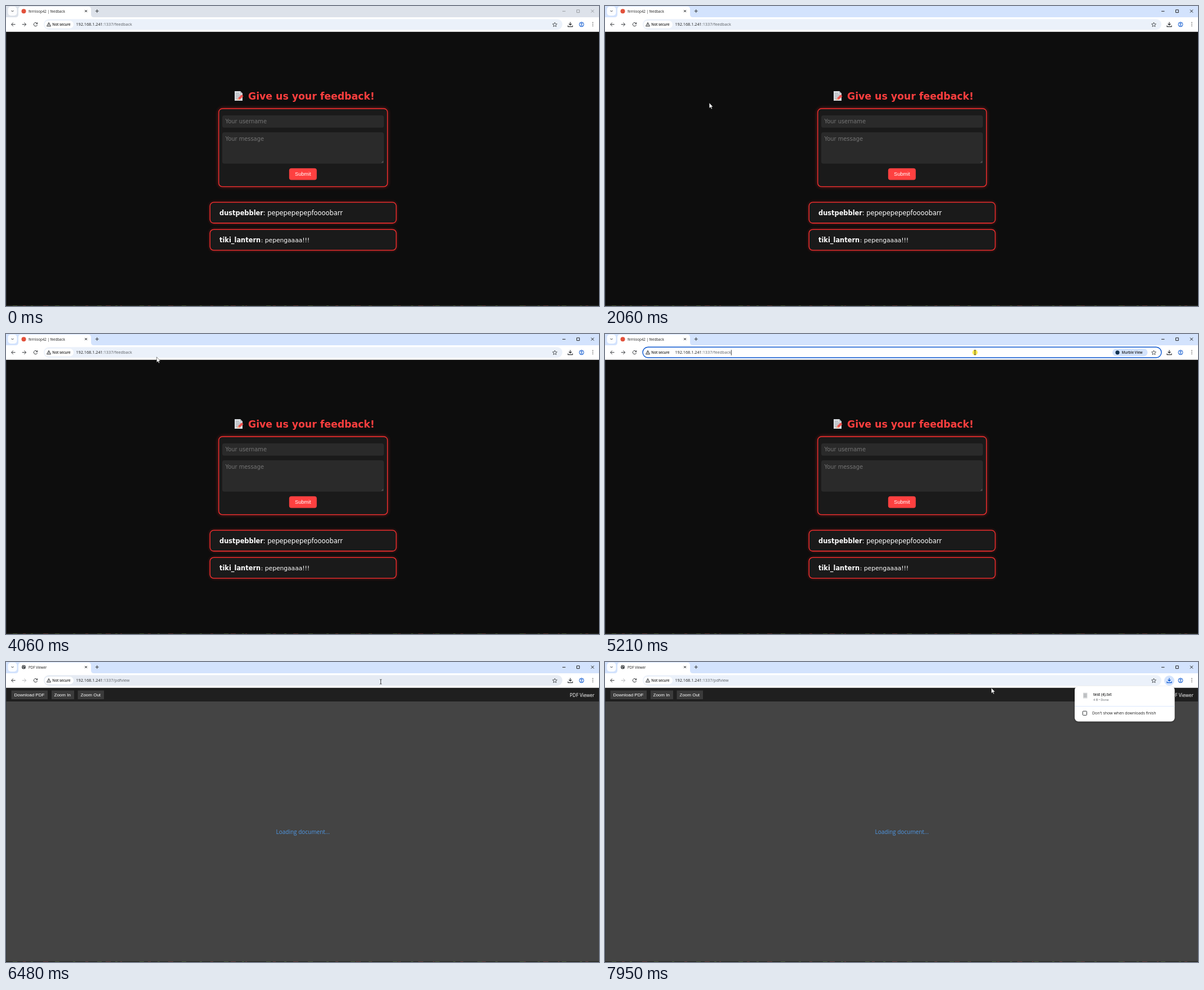
Write an HTML page that moves like this. It is 1053 by 532 pixels and loops after 8 s.

```html
<!DOCTYPE html>
<html lang="en">
<head>
<meta charset="utf-8">
<title>Feedback form</title>
<style>
  html, body { margin: 0; height: 100%; overflow: hidden; background: #0d0d0d; }
  svg { display: block; width: 100vw; height: 100vh; }
  text { font-family: "Open Sans", "Noto Sans", sans-serif; font-size: 7.27px; fill: #1f1f1f; white-space: pre; }
  .small, .small text { font-size: 6.2px; }
  .semi { font-weight: 600; }
  .grey { fill: #5b5f64; }
  .blue { fill: #0b57d0; }
  .wide text { font-family: "DejaVu Sans", sans-serif; fill: #fff; font-size: 11.4px; }
  .wide .title { font-size: 17.3px; font-weight: bold; fill: #ff3f3f; }
  .wide .hint { font-size: 9.87px; fill: #757575; }
  .arial text { font-family: "Liberation Sans", Arial, sans-serif; font-size: 8px; fill: #fff; }
  .panel { fill: #1a1a1a; stroke: #ff3030; stroke-width: 1.3; }
  .line { fill: none; stroke: #333639; stroke-width: 1; }
  .glow { filter: drop-shadow(0 0 3px rgba(255, 51, 51, .45)); }
</style>
</head>
<body>
<svg viewBox="0 0 1053 532" preserveAspectRatio="none">
  <defs>
    <clipPath id="chipClip"><rect id="chipWindow" x="68" y="24" width="49" height="18"/></clipPath>
    <g id="globe">
      <circle r="3.5" fill="#3c4043"/>
      <path d="M-2.6-.8Q-1-.6-1 .4T.2 2.6M.3-2.8Q-.6-1.4.9-1T2.8.2" class="line" style="stroke:#fff;stroke-width:.9"/>
    </g>
    <g id="tray">
      <path d="M0-4.3V1M-2.4-1.2L0 1.2L2.4-1.2M-4 1.8V4H4V1.8" fill="none" stroke-width="1.2"/>
    </g>
  </defs>

  <!-- feedback page -->
  <g id="feedback" class="wide">
    <rect y="45" width="1053" height="487" fill="#0d0d0d"/>
    <g>
      <path d="M406 151H416L420 155V168H406Z" fill="#d9dce0"/>
      <path d="M416 151V155H420Z" fill="#aab0b6"/>
      <path d="M408 155H414M408 158H417M408 161H415M408 164H412" stroke="#8e959c" stroke-width=".9"/>
      <path d="M410.5 167L412 163.5L418.5 157L421.5 160L415 166Z" fill="#ef5350"/>
      <path d="M410.5 167L412 163.5L415 166Z" fill="#f3c99b"/>
    </g>
    <text class="title" x="430" y="165.5">Give us your feedback!</text>
    <rect class="panel glow" x="377.8" y="182" width="299.6" height="138.4" rx="6.5"/>
    <rect x="384" y="194" width="287" height="21.7" rx="3.5" fill="#2a2a2a"/>
    <rect x="384" y="224" width="287" height="55.4" rx="3.5" fill="#2a2a2a"/>
    <path d="M667 278L670 275M669 278L670 277" stroke="#999" stroke-width=".6"/>
    <text class="hint" x="389.5" y="208">Your username</text>
    <text class="hint" x="389.5" y="238.5">Your message</text>
    <rect x="502.8" y="287.7" width="49" height="20.8" rx="4" fill="#ff4040"/>
    <g class="arial"><text x="513" y="301.2" style="font-size:9.2px">Submit</text></g>
    <g id="card1">
      <rect class="panel" x="362.3" y="348.2" width="330.6" height="36.8" rx="6.5"/>
      <text x="379" y="370.5" font-weight="bold">dustpebbler</text>
      <text x="456.7" y="370.5">: pepepepepepfoooobarr</text>
    </g>
    <g id="card2">
      <rect class="panel" x="362.3" y="396.3" width="330.6" height="36.8" rx="6.5"/>
      <text x="379" y="418.5" font-weight="bold">tiki_lantern</text>
      <text x="452.8" y="418.5" style="font-size:10.7px">: pepengaaaa!!!</text>
    </g>
  </g>

  <!-- document viewer page -->
  <g id="viewer">
    <rect y="45" width="1053" height="487" fill="#444"/>
    <rect y="45" width="1053" height="25" fill="#1f1f1f"/>
    <g class="arial">
      <path d="M9.5 50.5H74V66H9.5ZM81 50.5H121V66H81ZM127.5 50.5H174V66H127.5Z" fill="#3b3b3b"/>
      <text x="14.5" y="61">Download PDF</text>
      <text x="85.5" y="61">Zoom In</text>
      <text x="132.5" y="61">Zoom Out</text>
    </g>
    <text x="1001" y="61.8" style="font-size:8.4px;fill:#fff">PDF Viewer</text>
    <text x="479.5" y="304.5" style="font-size:10px;fill:#4f97e3">Loading document...</text>
  </g>

  <!-- desktop showing around the window -->
  <path d="M.4 46V532" stroke="#33383a" stroke-width=".8"/>
  <path d="M0 531.4H1053" stroke="#24271f" stroke-width="1.2"/>
  <path d="M30 531.5H1053" stroke="#5a3430" stroke-dasharray="5 31 9 17 3 46"/>
  <path d="M12 531.5H1053" stroke="#41502f" stroke-dasharray="8 24 4 39"/>

  <!-- browser frame -->
  <rect id="titleBar" width="1053" height="22"/>
  <rect x="3.5" y="1" width="16" height="16" rx="5" fill="#fff" opacity=".9"/>
  <path class="line" d="M9.5 8L11.5 10L13.5 8"/>
  <path d="M17 20Q22 20 22 15V6Q22 1 27 1H146Q151 1 151 6V15Q151 20 156 20H1053V45.7H0V20Z" fill="#fff"/>
  <path class="line" d="M140 7L144 11M144 7L140 11M161.7 6V12M158.7 9H164.7"/>
  <circle id="siteMark" cx="31.5" cy="9.3" r="4" fill="#e2513b"/>
  <use id="tabGlobe" href="#globe" x="31.5" y="9"/>
  <text id="tabTitle" class="small" x="40" y="11.5"></text>
  <path id="controls" class="line" d="M988 9.3H993.5M1013.5 6.8H1018.3V11.6H1013.5ZM1039 6.6L1044 11.6M1044 6.6L1039 11.6"/>
  <path class="line" d="M16.5 32.7H9.8M12.8 29.5L9.6 32.7L12.8 35.9"/>
  <path id="forward" class="line" d="M28.7 32.7H35.4M32.4 29.5L35.6 32.7L32.4 35.9"/>
  <path class="line" d="M55.3 31A3.2 3.2 0 1 0 55.6 33.5M55.8 29.2V31.6H53.2"/>
  <circle id="halo" cx="1002" cy="33" r="9" fill="#d3e3fd"/>
  <use id="download" href="#tray" x="1002" y="32.7"/>
  <g fill="none" stroke="#0b57d0">
    <circle cx="1022" cy="32.7" r="4"/><circle cx="1022" cy="31.5" r="1.3"/>
    <path d="M1019.4 35.6Q1022 33.2 1024.6 35.6"/>
  </g>
  <path d="M1042 29.3V37" stroke="#333" stroke-width="1.5" stroke-linecap="round" stroke-dasharray="0 3"/>

  <!-- address bar -->
  <rect id="bar" x="67" y="23.2" width="921" height="18.8" rx="9.4"/>
  <rect id="chip" x="68.5" y="26" height="13.6" rx="6.8" fill="#fff"/>
  <path class="line" d="M76 29.3L79.5 35.8H72.5ZM76 31.5V33.6M76 34.2V35" stroke-width=".9"/>
  <g clip-path="url(#chipClip)"><text class="small semi" x="82.3" y="35">Not secure</text></g>
  <g id="address">
    <rect id="selection" x="124" y="27.5" width="100" height="11" fill="#a8c7fa"/>
    <text x="124.4" y="35.4">192.168.1.241<tspan id="path" class="grey"></tspan></text>
    <path id="caret" d="M224.3 28.2V37.8" stroke="#111" stroke-width=".8"/>
  </g>
  <path class="line" d="M974.5 29L975.6 31.7L978.5 31.9L976.3 33.8L977 36.6L974.5 35.1L972 36.6L972.7 33.8L970.5 31.9L973.4 31.7Z" style="stroke-width:.8"/>
  <g id="finder">
    <rect x="901" y="26" width="62.5" height="13.6" rx="6.8" fill="#d3e3fd"/>
    <circle cx="910" cy="32.8" r="3.6" fill="#12314f"/>
    <text class="small semi" x="917.5" y="35">Murble View</text>
  </g>

  <!-- suggestions -->
  <g id="suggestions">
    <rect x="64" y="20" width="927" height="73.6" rx="8" fill="#fff" style="filter:drop-shadow(0 1px 2px rgba(0,0,0,.4))"/>
    <path d="M64 45.5H972Q982 45.5 982 56T972 67H64Z" fill="#f1f1f1"/>
    <path d="M64 45.5Q66 45.5 66 48V64.5Q66 67 64 67Z" fill="#0b57d0"/>
    <use href="#globe" x="80" y="32.8"/><use href="#globe" x="80" y="56"/>
    <rect x="196.7" y="27" width="126" height="11.8" fill="#0b57d0"/>
    <text x="94.5" y="35.4">192.168.1.241<tspan class="grey">:1337/feedback?</tspan></text>
    <text x="196.9" y="35.4" style="fill:#fff">b01829f1f013fe3bf52f026d6e053a7a</text>
    <text x="94.5" y="58.7">PDF Viewer</text><text class="grey" x="135.6" y="58.7">-</text>
    <text x="141.5" y="58.7" class="blue" font-weight="700">192.168.1.241:1337/feedback?</text>
    <text x="251.8" y="58.7" class="blue">b01829f1f013fe3bf52f026d6e053a7a</text>
    <path class="line" d="M964.5 53.6L969.3 58.4M969.3 53.6L964.5 58.4"/>
    <g class="line"><circle cx="79.3" cy="77.3" r="2"/><path d="M80.8 78.8L83 81"/></g>
    <text x="94.5" y="80.8">192.168.1.241:1337/feedback?</text>
    <text class="grey" x="199.2" y="80.8">- Murble Search</text>
  </g>

  <!-- download feedback -->
  <g id="rising">
    <circle r="17.5" fill="#ecf1f9"/>
    <use href="#tray" transform="scale(1.75)" stroke="#1a50a8"/>
  </g>
  <g id="bubble">
    <rect x="834" y="43" width="177.6" height="62.4" rx="6.5" fill="#fff" style="filter:drop-shadow(0 1px 1.5px rgba(0,0,0,.35))"/>
    <path d="M849 54.5H856.5V64.5H849Z" fill="#d5d7d9"/>
    <path d="M850 57H855.5M850 59.3H855.5M850 61.6H855.5" stroke="#8d9094" stroke-width=".7"/>
    <text x="867" y="60" style="font-size:6.6px" class="semi">test (4).txt</text>
    <text x="867" y="69" style="font-size:5.6px" class="grey">4 B • Done</text>
    <path d="M834 78.5H1011.6" stroke="#d3e3fd" stroke-width=".8"/>
    <rect class="line" x="848.3" y="87.2" width="7.2" height="7.2" rx="1"/>
    <text x="865" y="93.4" style="font-size:7px">Don't show when downloads finish</text>
  </g>

  <!-- pointer -->
  <circle id="click" cx="657" cy="32.8" r="4.6" fill="#fbe94b"/>
  <path id="arrow" d="M0 0V9.6L2.2 7.6L3.8 11L5.2 10.3L3.7 7.1H6.7Z" fill="#fff" stroke="#111" stroke-width=".5"/>
  <path id="beam" d="M-1.7-4H-.4L0-3.6L.4-4H1.7M0-3.6V3.6M-1.7 4H-.4L0 3.6L.4 4H1.7" fill="none" stroke="#111" stroke-width=".8"/>
</svg>
<script>
const LOOP = 8000;
const $ = id => document.getElementById(id);
const clamp = v => Math.min(1, Math.max(0, v));
const ease = v => v * v * (3 - 2 * v);
const progress = (t, start, length) => ease(clamp((t - start) / length));
const show = (id, on) => { $(id).style.display = on ? '' : 'none'; };
const set = (id, name, value) => $(id).setAttribute(name, value);

// time, x, y
const pointerPath = [
  [390, 610, 530], [560, 600, 432], [800, 580, 386], [1130, 550.7, 331.5],
  [1300, 510, 398], [1500, 420, 424], [1770, 220, 340], [2060, 185, 172],
  [2500, 235, 70], [2860, 256, 36], [2990, 267.5, 40.8], [4260, 267.5, 40.8],
  [4700, 888, 43], [5000, 657, 32.8], [5300, 657, 32.8], [5540, 665.5, 35],
  [7949, 665.5, 35], [7950, 686, 46]
];

function pointerAt(t) {
  const next = pointerPath.findIndex(key => key[0] > t);
  if (next < 0) return pointerPath.at(-1).slice(1);
  if (next === 0) return pointerPath[0].slice(1);
  const [from, to] = [pointerPath[next - 1], pointerPath[next]];
  const p = (t - from[0]) / (to[0] - from[0]);
  return [1, 2].map(i => from[i] + (to[i] - from[i]) * p);
}

function drawCard(id, cy, t, ...visits) {
  const hover = visits.reduce((sum, [enter, leave]) =>
    sum + progress(t, enter, 250) - progress(t, leave, 250), 0);
  set(id, 'transform', `translate(527.6 ${cy}) scale(${1 + .021 * hover}) translate(-527.6 ${-cy})`);
  $(id).style.filter = `drop-shadow(0 0 ${2.5 + 1.5 * hover}px rgba(255,51,51,${.4 + .35 * hover}))`;
}

function drawPointer(t) {
  const [x, y] = pointerAt(t);
  const overText = y > 23 && y < 40.5;
  show('arrow', t >= 390 && !overText);
  show('beam', overText);
  for (const id of ['arrow', 'beam']) set(id, 'transform', `translate(${x} ${y})`);
  show('click', t >= 5140 && t < 5300);
  return overText;
}

function drawAddressBar(t, hovered, onViewer) {
  const selected = (t >= 2800 && t < 3390) || (t >= 5070 && t < 5140);
  const focused = selected || (t >= 5140 && t < 6480);
  set('bar', 'fill', focused ? '#fff' : hovered ? '#e6ebf3' : '#ebf1fa');
  set('bar', 'stroke', focused ? '#0b57d0' : 'none');
  set('bar', 'stroke-width', 1.4);
  show('selection', selected);
  show('caret', t >= 5140 && t < 6010);
  show('finder', t >= 5140 && t < 6480);

  const folded = t >= 3390 ? 20.5 * (1 - progress(t, 3390, 400)) : 0;
  set('chip', 'width', 51.5 - folded);
  set('chipWindow', 'width', 49 - folded);
  set('address', 'transform', `translate(${-folded} 0)`);
  $('path').textContent = onViewer ? ':1337/pdfview' : ':1337/feedback';
  show('suggestions', t >= 6010 && t < 6480);
}

function drawDownload(t) {
  const begun = t >= 6540;
  set('download', 'stroke', begun ? '#0b57d0' : '#333639');
  show('halo', t >= 7010);

  const opening = clamp((t - 6600) / 200);
  const scale = .95 + .05 * opening;
  show('bubble', opening > 0);
  set('bubble', 'opacity', opening);
  set('bubble', 'transform', `translate(922.8 74) scale(${scale}) translate(-922.8 -74)`);

  const rise = (t - 6540) / 430;
  show('rising', rise > 0 && rise < 1);
  set('rising', 'opacity', Math.max(0, Math.min(rise * 1.85, (1 - rise) * 1.6, 1)) * .98 * (rise < .35 ? .98 : 1));
  set('rising', 'transform', `translate(1002 ${214 - 107 * rise})`);
}

function draw(t) {
  const active = t >= 390, onViewer = t >= 6480;
  set('titleBar', 'fill', active ? '#d3e3fd' : '#dde2ea');
  $('controls').style.stroke = active ? '#222' : '#999da2';
  show('feedback', !onViewer);
  show('viewer', onViewer);
  show('siteMark', !onViewer);
  show('tabGlobe', onViewer);
  $('tabTitle').textContent = onViewer ? 'PDF Viewer' : 'fernloop42 | feedback';
  $('forward').style.stroke = onViewer ? '#b5b7ba' : '#333639';
  drawCard('card1', 366.6, t, [800, 1130]);
  drawCard('card2', 414.7, t, [560, 800], [1300, 1560]);
  drawAddressBar(t, drawPointer(t), onViewer);
  drawDownload(t);
}

const began = performance.now();
(function tick() {
  draw((performance.now() - began) % LOOP);
  requestAnimationFrame(tick);
})();
</script>
</body>
</html>
```
